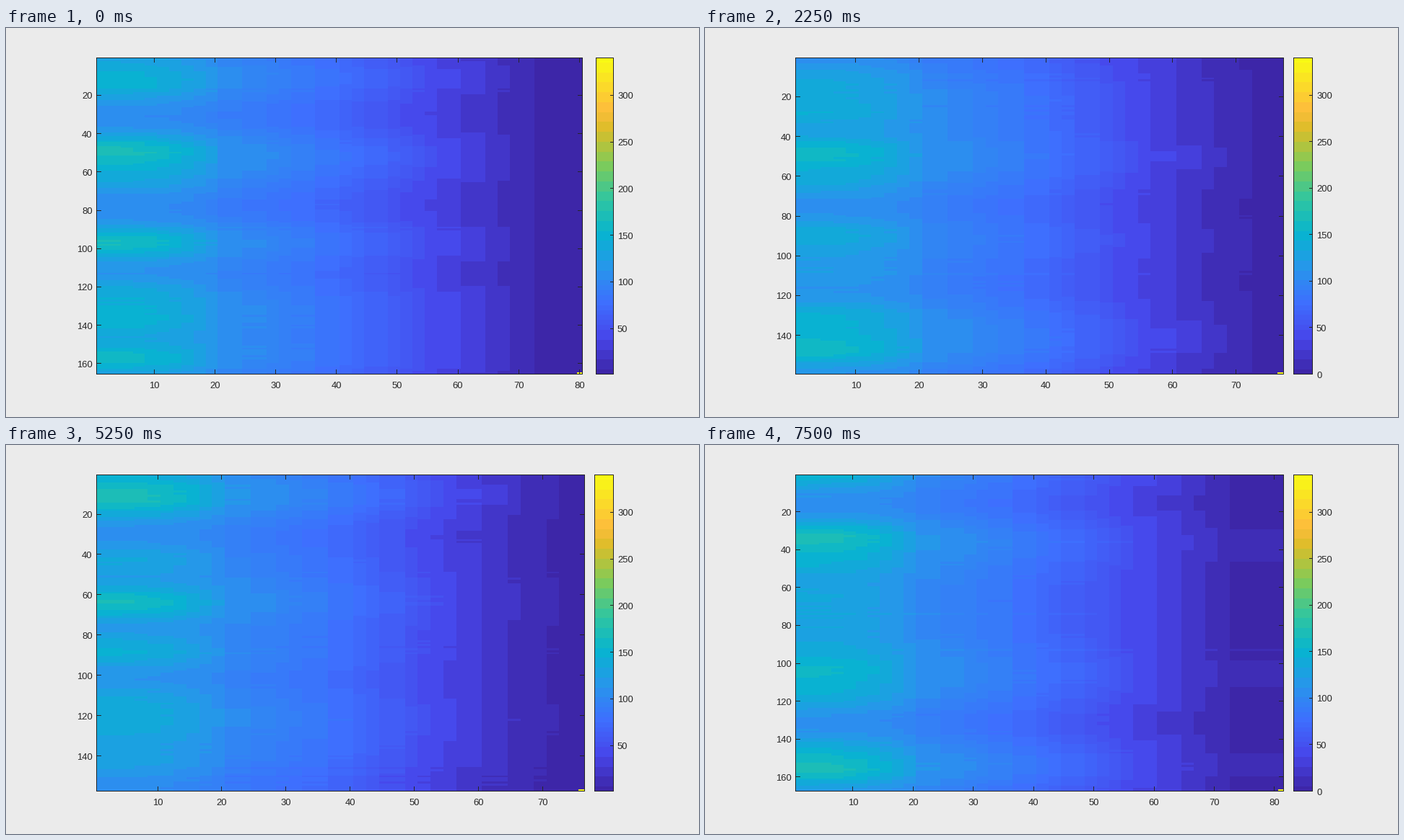
Animation, 960 px wide and 540 px high, one loop 8000 ms. Source, as a matplotlib script:

```python
import numpy as np
import matplotlib.pyplot as plt
from matplotlib.animation import FuncAnimation

W, H, DPI = 960, 540, 100
LEFT, TOP, BOTTOM, BAR_END = 125, 41, 480, 841
VMAX = 340
INK = "#262626"
plt.rcParams["font.family"] = "Liberation Sans"

# Key colours of the blue-teal-yellow ramp and the levels they sit on
RAMP_AT = [0, 7, 14, 21, 28, 35, 42, 49, 53, 63]
RAMP = np.array([
    [.242, .150, .660], [.280, .278, .922], [.244, .436, .999],
    [.154, .590, .922], [.030, .708, .816], [.194, .776, .625],
    [.504, .799, .348], [.863, .741, .160], [.996, .743, .237],
    [.977, .984, .081]])

# Value along a quiet row and along a strong row
KEY_COLS = [20, 34, 50, 66, 74]
QUIET = [85, 72, 43, 13, 1]
STRONG = [118, 98, 66, 24, 6]

# Columns are resampled in bands of two or four
EDGES = sorted({*range(0, 84, 4), *range(2, 20, 4), 30, 42, 50, 54, 66, 70})

# Rows of each scan, and its bright bursts as {row: strength};
# a scan without bursts lies halfway between its neighbours
ROWS = [165, 162, 160, 159, 158, 154, 152, 157, 160, 164, 167]
BURSTS = {
    0: {4: .4, 15: .65, 49: 1, 63: .5, 97: 1, 124: .6, 138: .7, 157: .9},
    1: {3: .4, 15: .7, 36: .3, 49: .9, 62: .5, 100: 1, 128: .65, 145: 1},
    3: {13: .5, 28: .6, 48: .85, 62: .5, 90: .6, 108: .3, 131: .7, 147: .9},
    5: {7: .3, 27: .6, 39: .6, 56: .55, 87: .8, 108: .45, 128: .5, 141: .9},
    7: {3: .6, 14: .9, 43: .5, 64: 1, 88: .7, 113: .5, 126: .5, 142: .4},
    9: {3: .5, 13: .9, 47: .55, 62: .9, 71: .4, 95: .5, 113: .45, 133: .9,
        162: .5},
    10: {0: .75, 33: 1, 47: .6, 64: .45, 78: .4, 92: .4, 104: .7, 117: .55,
         146: .5, 157: .9}}
LIFTED = {0, 7, 9}  # scans whose lowest value is one


def colours(level):
    """Colour of levels 0..63; neighbours share a colour outside mid blue."""
    level = np.asarray(level)
    paired = np.where(level > 0, (level + 1) // 2 * 2 - .5, 0)
    pos = np.where((level >= 9) & (level <= 18), level, paired)
    return np.stack([np.interp(pos, RAMP_AT, ch) for ch in RAMP.T], -1)


def bumps(step, width):
    """Sum of the bursts over the rows of one scan."""
    near = [step] if step in BURSTS else [step - 1, step + 1]
    row = np.arange(1, ROWS[step] + 1)
    return sum(s * np.exp(-((row - r) / width) ** 2) / len(near)
               for k in near for r, s in BURSTS[k].items())


def field(step, cols):
    rng = np.random.default_rng(step + 7)
    rows = ROWS[step]
    strength = bumps(step, 9) + rng.normal(0, .025, rows)
    reach = .75 * bumps(step, 13) + rng.normal(0, .012, rows)
    reach += (rng.random(rows) < .06) * rng.normal(0, .07, rows)
    strength, reach = np.clip(strength, 0, 1.1), np.clip(reach, 0, 1)

    v = np.zeros((rows, cols))
    for start, end in zip(EDGES, EDGES[1:] + [cols]):
        mid = (start + end) / 2
        low = np.interp(mid, KEY_COLS, QUIET)
        high = np.interp(mid, KEY_COLS, STRONG)
        # shorter scans fade out a little earlier
        shift = (80 - cols) / 9 * np.clip((mid - 40) / 24, 0, 1)
        band = low + (high - low) * (reach - shift)
        if end <= 20:
            fall = (start / 20) ** 2.5
            band += (102 + 64 * strength - band) * (1 - fall)
        v[:, start:end] = band[:, None]
    v[-1, -1] = VMAX
    return v


def to_rgb(v, low):
    level = np.floor((v - low) / (VMAX - low) * 64).astype(int)
    return colours(np.clip(level, 0, 63))


def label(x, y, value, align):
    ax.text(x, y, str(value), ha=align, va="baseline", color=INK,
            fontsize=13 * 72 / DPI)


def line(xs, ys):
    """One-pixel line through the centres of whole pixels."""
    ax.plot(np.floor(xs) + .5, np.floor(ys) + .5, color=INK, lw=72 / DPI,
            snap=False, solid_capstyle="projecting", solid_joinstyle="miter")


def panel(rgb, x0, x1):
    ax.imshow(rgb, extent=(x0, x1 + 1, BOTTOM + 1, TOP),
              interpolation="nearest", aspect="auto")
    line([x0, x1, x1, x0, x0], [TOP, TOP, BOTTOM, BOTTOM, TOP])


fig = plt.figure(figsize=(W / DPI, H / DPI), dpi=DPI, facecolor="#ebebeb")
ax = fig.add_axes([0, 0, 1, 1])


def draw(i):
    step = min(i // 3, len(ROWS) - 1)
    rows, low = ROWS[step], int(step in LIFTED)
    cols = round(rows * .487)
    right, bar = (798, 817) if cols == 80 else (801, 815)
    ax.clear()
    ax.axis("off")

    panel(to_rgb(field(step, cols), low), LEFT, right)
    for t in range(10, cols + 1, 10):
        x = LEFT + .5 + (t - .5) * (right - LEFT) / cols
        line([x, x], [TOP, TOP + 6])
        line([x, x], [BOTTOM, BOTTOM - 6])
        label(x, 500, t, "center")
    for t in range(20, rows + 1, 20):
        y = TOP + .5 + (t - .5) * (BOTTOM - TOP) / rows
        line([LEFT, LEFT + 6], [y, y])
        line([right, right - 6], [y, y])
        label(119.5, y + 5, t, "right")

    panel(colours(np.arange(63, -1, -1))[:, None, :], bar, BAR_END)
    for t in range(50 * low, VMAX, 50):
        y = BOTTOM + .5 - (t - low) / (VMAX - low) * (BOTTOM - TOP)
        line([BAR_END, BAR_END - 4], [y, y])
        label(847, y + 5, t, "left")

    ax.set_xlim(0, W)
    ax.set_ylim(H, 0)
    return []


anim = FuncAnimation(fig, draw, frames=32, interval=250, init_func=lambda: [],
                     repeat=True, repeat_delay=0)
plt.show()
```
